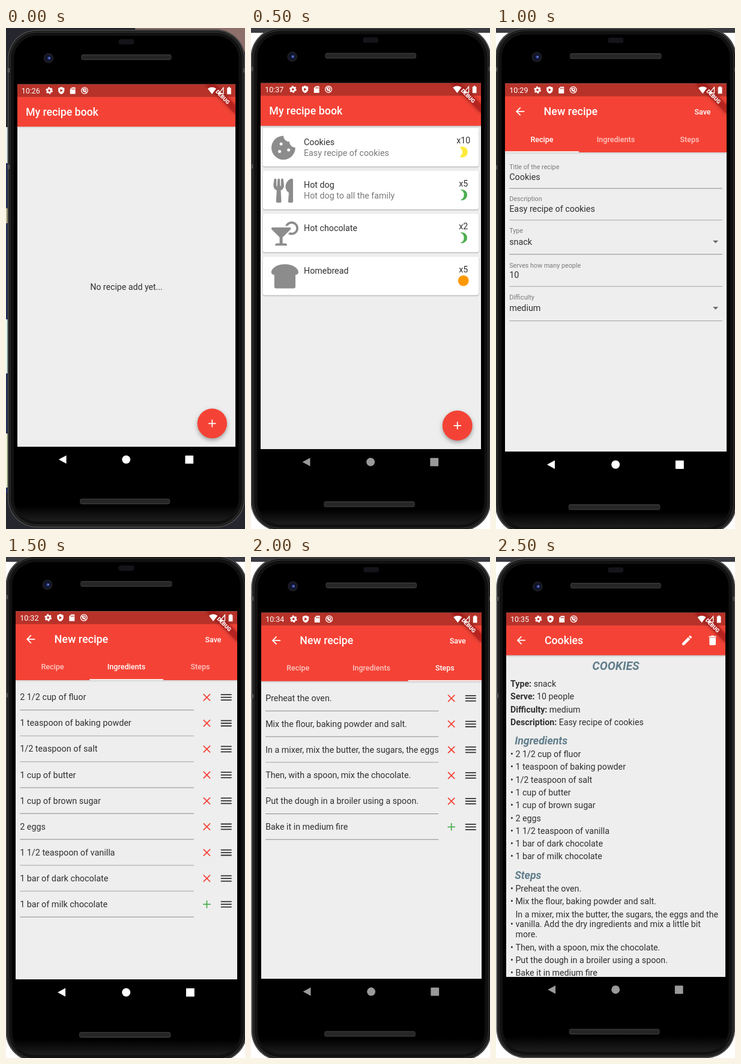
An HTML page with a canvas for the animation above (3 s loop, 398 px wide and 834 px high).

```html
<!DOCTYPE html>
<html lang="en">
<head>
<meta charset="utf-8">
<title>Recipe book</title>
<style>
html, body { margin: 0; height: 100%; overflow: hidden; background: #fff; }
canvas { display: block; }
</style>
</head>
<body>
<canvas id="stage" width="398" height="834"></canvas>
<script>
const ctx = document.getElementById('stage').getContext('2d');
const W = 411.4, H = 683.4; // app area in dp; everything on the phone is drawn in dp
const RED = '#f44336', GREEN = '#4caf50', INK = '#303030', MUTED = '#7a7a7a', WHITE = '#fff';

const icons = Object.fromEntries(Object.entries({
  back: 'M20 11H7.83l5.59-5.59L12 4l-8 8 8 8 1.41-1.41L7.83 13H20z',
  edit: 'M3 17.25V21h3.75L17.81 9.94l-3.75-3.75zM20.71 7.04c.39-.39.39-1.02 0-1.41l-2.34-2.34c-.39-.39-1.02-.39-1.41 0l-1.83 1.83 3.75 3.75z',
  trash: 'M6 19c0 1.1.9 2 2 2h8c1.1 0 2-.9 2-2V7H6zM19 4h-3.5l-1-1h-5l-1 1H5v2h14z',
  add: 'M19 13h-6v6h-2v-6H5v-2h6V5h2v6h6z',
  clear: 'M19 6.41L17.59 5 12 10.59 6.41 5 5 6.41 10.59 12 5 17.59 6.41 19 12 13.41 17.59 19 19 17.59 13.41 12z',
  handle: 'M2 15.5v2h20v-2zm0-5v2h20v-2zm0-5v2h20v-2z',
  drop: 'M7 10l5 5 5-5z',
  halfMoon: 'M10 2c-1.82 0-3.53.5-5 1.35C7.99 5.08 10 8.3 10 12s-2.01 6.92-5 8.65A10 10 0 1 0 10 2z',
  moon: 'M9 2c-1.05 0-2.05.16-3 .46a10 10 0 0 1 0 19.08A10 10 0 1 0 9 2z',
  disc: 'M2 12a10 10 0 1 0 20 0a10 10 0 1 0-20 0z',
  cookie: 'M510 256A128 128 0 0 1 384 128A128 128 0 0 1 256 1.5A254 254 0 1 0 510 256z' +
    ['144 336', '176 176', '336 304'].map(p => `M${p}a32 32 0 1 0 64 0a32 32 0 1 0-64 0z`).join(''),
  cutlery: 'M208 15c1 5 16 95 16 129 0 52-28 90-69 105l13 238c1 14-10 25-24 25H80c-14 0-25-11-24-25l13-238C28 234 0 196 0 144 0 110 15 20 16 15c3-20 45-20 48 1v142c1 3 15 3 16 0L88 16c3-21 45-21 48 0l8 142c1 3 15 3 16 0V16c3-21 45-21 48-1zM327 301l-15 185c-1 14 10 26 24 26h56c13 0 24-11 24-24V24c0-13-11-24-24-24-82 0-221 178-65 301z',
  drink: 'M296 464h-56V339L409 170c15-16 4-42-18-42H25c-22 0-33 26-18 42l169 169v125h-56c-22 0-40 18-40 40 0 4 4 8 8 8h240c4 0 8-4 8-8 0-22-18-40-40-40zM432 0c-63 0-115 40-135 96h52c17-29 48-48 83-48a96 96 0 1 1-39 183l-36 36A144 144 0 1 0 432 0z',
  bread: 'M288 0C108 0 0 93 0 169c0 30 24 55 64 55v256c0 18 16 32 36 32h376c20 0 36-14 36-32V224c40 0 64-25 64-55C576 93 468 0 288 0z'
}).map(([name, d]) => [name, new Path2D(d)]));

function rect(x, y, w, h, color, r = 0) {
  ctx.fillStyle = color;
  ctx.beginPath();
  ctx.roundRect(x, y, w, h, r);
  ctx.fill();
}

function disc(x, y, r, color) {
  ctx.fillStyle = color;
  ctx.beginPath();
  ctx.arc(x, y, r, 0, 7);
  ctx.fill();
}

function ring(x, y, r, width, color) {
  ctx.strokeStyle = color;
  ctx.lineWidth = width;
  ctx.beginPath();
  ctx.arc(x, y, r, 0, Math.PI * 2);
  ctx.stroke();
}

function shape(d, color) {
  ctx.fillStyle = color;
  ctx.fill(new Path2D(d));
}

function text(s, x, y, { size = 16, style = '400', color = INK, align = 'left' } = {}) {
  ctx.font = `${style} ${size}px Roboto, sans-serif`;
  ctx.fillStyle = color;
  ctx.textAlign = align;
  ctx.fillText(s, x, y);
  return ctx.measureText(s).width;
}

// Places an icon by its centre (24-unit grid) or by its corner when a scale is given.
function icon(name, x, y, color, scale) {
  ctx.save();
  ctx.translate(scale ? x : x - 12, scale ? y : y - 12);
  if (scale) ctx.scale(scale, scale);
  ctx.fillStyle = color;
  ctx.fill(icons[name], 'evenodd');
  ctx.restore();
}

function withShadow(blur, dy, alpha, draw) {
  ctx.save();
  ctx.shadowColor = `rgba(0,0,0,${alpha})`;
  ctx.shadowBlur = blur;
  ctx.shadowOffsetY = dy;
  draw();
  ctx.restore();
}

function backdrop(colorful) {
  rect(0, 0, 398, 834, WHITE);
  rect(0, 0, 398, 8, '#3a3b40');
  if (!colorful) return;
  rect(0, 0, 398, 834, '#26272e');
  rect(215, 0, 183, 40, '#8d706c');
  rect(0, 225, 6, 550, '#22315a');
  [[165, 60, '#e4eeee'], [300, 25, '#b9b48e'], [485, 90, '#d5f1ea'], [675, 90, '#e3ecc4']]
    .forEach(([y, h, color]) => rect(0, y, 6, h, color));
}

function phone(navColor) {
  const front = ctx.createLinearGradient(0, 795, 0, 832);
  front.addColorStop(0, '#000');
  front.addColorStop(1, '#262626');
  [[0, '#2c2c2c'], [1, '#5a5a5a'], [2.2, '#191919'], [4.6, '#333'], [5.8, '#111'], [12, front]]
    .forEach(([d, color]) => rect(d - 18.4, d - 103, 448 - 2 * d, 939 - 2 * d, color, 55 - d));
  for (const y of [-30, 152]) rect(-18.4, y, 4, 8, '#555');
  rect(426, -30, 4, 8, '#555');
  rect(191, -85, 29, 10, '#14141a', 4);
  for (const [x, y] of [[120.5, -56], [118, 781]]) {
    rect(x, y, 170, 10.5, '#3b3b3b', 4);
    rect(x + 1, y + 1.5, 168, 7.5, '#262626', 3);
  }
  disc(59, -49, 9.5, '#1b1c22');
  disc(59, -49, 6.5, '#10142c');
  disc(60, -49, 3, '#2f3f8c');
  disc(60.5, -49.5, 1.2, '#8fa0e0');
  shape('M78 707.4L92.5 699.5V715.3Z', navColor);
  disc(205.3, 707.4, 7.8, navColor);
  rect(316.5, 699.8, 15.5, 15.5, navColor, 1);
}

function banner() {
  ctx.save();
  ctx.translate(W, 0);
  ctx.rotate(Math.PI / 4);
  withShadow(6, 0, .5, () => rect(-40, 28, 80, 12, 'rgba(183,28,28,.63)'));
  text('DEBUG', 0, 37.7, { size: 10.2, style: '900', color: WHITE, align: 'center' });
  ctx.restore();
}

function statusBar(clock) {
  const dark = '#b73229';
  text(clock, 8, 17.3, { size: 14, color: WHITE });
  ring(60.3, 12, 3.6, 3, WHITE);
  ctx.setLineDash([Math.PI, Math.PI * 2 * 5.6 / 6 - Math.PI]);
  ring(60.3, 12, 5.6, 2, WHITE);
  ctx.setLineDash([]);
  shape('M83 5.2l5.8 2.3v4.2c0 3.5-2.4 6.2-5.8 7.3-3.4-1.1-5.8-3.8-5.8-7.3V7.5z', WHITE);
  shape('M81 9v6l5-3z', dark);
  shape('M103 6h6.5v12.5h-10V9.5z', WHITE);
  for (const x of [102.5, 104.7, 106.9]) rect(x, 8, 1.2, 2.6, dark);
  ring(126.8, 12, 6, 1.5, WHITE);
  ring(126.8, 11.5, 2.7, 1.5, WHITE);
  ctx.beginPath();
  ctx.moveTo(123, 9);
  ctx.lineTo(130.5, 16.5);
  ctx.stroke();
  shape('M367 18.8L359 8.5Q367 3 375 8.5z', WHITE);
  ctx.stroke(new Path2D('M388.5 7v10.8h-9z'));
  shape('M395.5 7h2V5.5h3.5V7h2v12h-7.5z', WHITE);
}

function appBar(height, title, x, hasBack) {
  withShadow(3, 1, .25, () => rect(0, 0, W, height, RED));
  rect(0, 0, W, 24, 'rgba(0,0,0,.25)');
  text(title, x, 59.2, { size: 20, style: '500', color: WHITE });
  if (hasBack) icon('back', 28, 52, WHITE);
}

function homeBar() {
  appBar(80, 'My recipe book', 16);
}

function addButton() {
  withShadow(7, 3, .35, () => disc(W - 44, H - 44, 28, RED));
  icon('add', W - 44, H - 44, WHITE);
}

function editorBar(active) {
  appBar(128, 'New recipe', 72, true);
  text('Save', 366.8, 57.2, { size: 14, style: '500', color: WHITE, align: 'center' });
  ['Recipe', 'Ingredients', 'Steps'].forEach((label, i) => text(label, W * (2 * i + 1) / 6, 108.4, {
    size: 14, style: '500', align: 'center', color: i === active ? WHITE : 'rgba(255,255,255,.7)'
  }));
  rect(W / 3 * active, 126, W / 3, 2, WHITE);
}

function editableList(lines) {
  lines.forEach((line, i) => {
    const y = 48 * i, last = i === lines.length - 1;
    ctx.save();
    ctx.beginPath();
    ctx.rect(8, y + 140, 323, 40);
    ctx.clip();
    text(line, 8, y + 165.2);
    ctx.restore();
    rect(8, y + 183, 323, 1, '#8a8a8a');
    icon(last ? 'add' : 'clear', 355, y + 160, last ? GREEN : RED);
    icon('handle', 391, y + 160.5, INK);
  });
}

const ingredients = ['2 1/2 cup of fluor', '1 teaspoon of baking powder', '1/2 teaspoon of salt',
  '1 cup of butter', '1 cup of brown sugar', '2 eggs', '1 1/2 teaspoon of vanilla',
  '1 bar of dark chocolate', '1 bar of milk chocolate'];
const mixing = ['In a mixer, mix the butter, the sugars, the eggs and the',
  'vanilla. Add the dry ingredients and mix a little bit', 'more.'];
const steps = ['Preheat the oven.', 'Mix the flour, baking powder and salt.', mixing.join(' '),
  'Then, with a spoon, mix the chocolate.', 'Put the dough in a broiler using a spoon.',
  'Bake it in medium fire'];

function emptyHome() {
  homeBar();
  text('No recipe add yet...', W / 2, 387.2, { align: 'center' });
  addButton();
}

function recipeList() {
  [['cookie', 20, 'Cookies', 'Easy recipe of cookies', 'x10', 'halfMoon', '#ffeb3b'],
   ['cutlery', 24, 'Hot dog', 'Hot dog to all the family', 'x5', 'moon', GREEN],
   ['drink', 20, 'Hot chocolate', '', 'x2', 'moon', GREEN],
   ['bread', 20, 'Homebread', '', 'x5', 'disc', '#ff9800']
  ].forEach(([picture, x, name, note, serves, level, color], i) => {
    const y = 80 * i;
    withShadow(2, 1, .3, () => rect(4, y + 84, W - 8, 72, WHITE, 4));
    icon(picture, x, y + 98.5, '#8c8c8c', 45 / 512);
    text(name, 80.7, y + 115.9);
    text(note, 80.7, y + 136, { color: MUTED });
    text(serves, 378.6, y + 113.3, { align: 'center' });
    icon(level, 378.6, y + 129, color);
  });
  homeBar();
  addButton();
}

function recipeForm() {
  editorBar(0);
  [['Title of the recipe', 'Cookies', 158.7, 178.8, 194.7],
   ['Description', 'Easy recipe of cookies', 218, 237.8, 253.7],
   ['Type', 'snack', 277.7, 299.6, 317.2, true],
   ['Serves how many people', '10', 341.7, 361, 376.7],
   ['Difficulty', 'medium', 400.7, 422.6, 440.7, true]
  ].forEach(([label, value, labelY, valueY, lineY, menu]) => {
    text(label, 8, labelY, { size: 12, color: MUTED });
    text(value, 8, valueY);
    rect(8, lineY - .5, W - 16, 1, '#8a8a8a');
    if (menu) icon('drop', 391, valueY - 6, '#666');
  });
}

function ingredientForm() {
  editorBar(1);
  editableList(ingredients);
}

function stepForm() {
  editorBar(2);
  editableList(steps);
}

function recipePage() {
  const heading = { size: 20, style: 'italic 700', color: '#607d8b' };
  appBar(80, 'Cookies', 72, true);
  icon('edit', W - 72, 52, WHITE);
  icon('trash', W - 24, 52, WHITE);
  text('COOKIES', W / 2, 108, { ...heading, size: 22, align: 'center' });
  [['Type:', 'snack'], ['Serve:', '10 people'], ['Difficulty:', 'medium'],
   ['Description:', 'Easy recipe of cookies']].forEach(([label, value], i) => {
    const y = 139.1 + 24 * i;
    const width = text(label, 8, y, { style: '700' });
    text(' ' + value, 8 + width, y);
  });
  text('Ingredients', 16, 247, heading);
  ingredients.forEach((line, i) => text('• ' + line, 8, 271 + 24 * i));
  text('Steps', 16, 499.4, heading);
  let y = 523.4;
  steps.forEach((line, i) => {
    if (i === 2) {
      mixing.forEach((part, j) => text(part, 17.4, y + 19 * j));
      text('•', 8, y + 19);
      y += 38;
    } else text('• ' + line, 8, y);
    y += 24;
  });
}

// Each screen: drawing, clock, left, top, width, navigation button colour.
const screens = [
  [emptyHome, '10:26', 18.8, 93.5, 363.4, WHITE],
  [recipeList, '10:37', 16, 91.4, 367, '#9a9a9a'],
  [recipeForm, '10:29', 15, 92.3, 369, WHITE],
  [ingredientForm, '10:32', 16, 90.2, 369, WHITE],
  [stepForm, '10:34', 17, 92.5, 367, '#9a9a9a'],
  [recipePage, '10:35', 17, 92.6, 365, '#9a9a9a']
];

function render() {
  const index = Math.floor(performance.now() % 3000 / 500);
  const [draw, clock, left, top, width, navColor] = screens[index];
  ctx.save();
  backdrop(index === 0);
  ctx.translate(left, top);
  ctx.scale(width / W, width / W);
  phone(navColor);
  ctx.beginPath();
  ctx.rect(0, 0, W, H);
  ctx.clip();
  rect(0, 0, W, H, '#eee');
  draw();
  banner();
  statusBar(clock);
  ctx.restore();
  requestAnimationFrame(render);
}
render();
</script>
</body>
</html>
```
